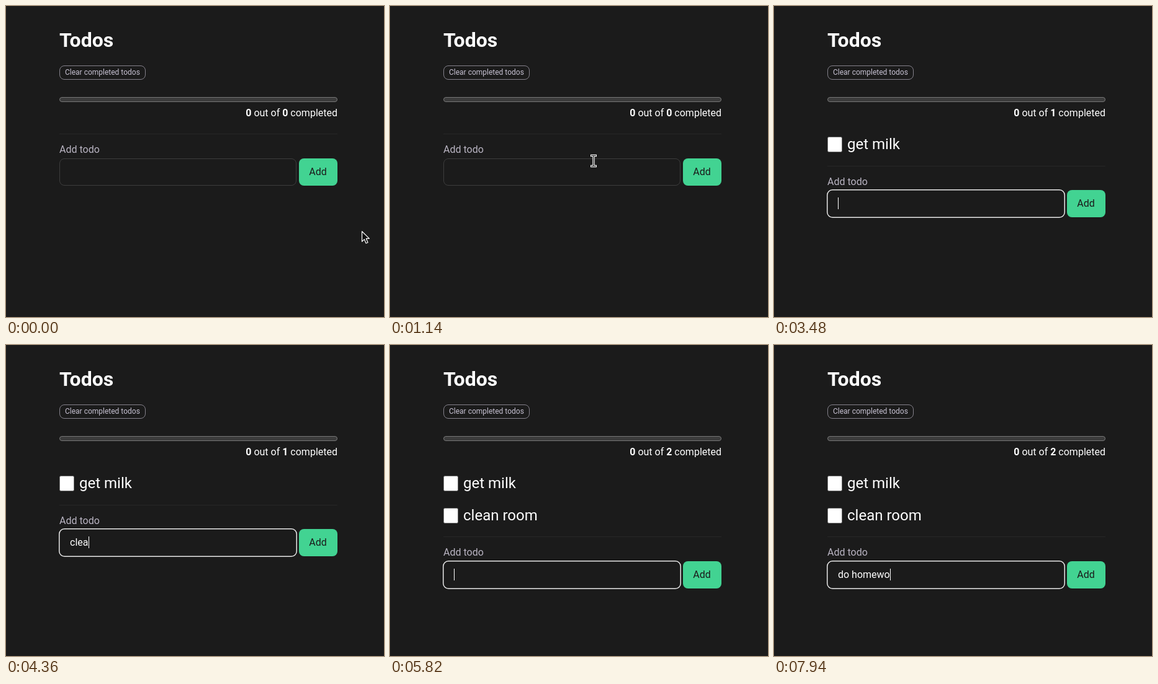
An HTML page that plays this animation: 609x502 px, repeating every 8000 ms.

```html
<!DOCTYPE html>
<html lang="en">
<head>
<meta charset="utf-8">
<title>Todos</title>
<style>
  html, body { margin: 0; width: 100%; height: 100%; overflow: hidden; background: #1b1b1b; }
  svg { display: block; width: 609px; height: 502px; }
  text { font: 16px Roboto, sans-serif; fill: #fff; white-space: pre; }
  .title { font-size: 32px; font-weight: 700; }
  .small { font-size: 12px; fill: #c8c3d4; }
  .label { fill: #b9b4c2; }
  .todo text { font-size: 24px; }
  .dark { fill: #1b1b1b; }
  .bold { font-weight: 700; }
  .line { fill: none; stroke: #3d3d3d; }
  .ring { fill: none; stroke: #e8e8e8; stroke-width: 1.5; }
  .check { fill: #fff; stroke: #767676; }
</style>
</head>
<body>
<svg viewBox="0 0 609 502">
  <rect width="609" height="502" fill="#1b1b1b"/>
  <text class="title" x="86" y="66">Todos</text>
  <rect x="86.5" y="96.5" width="138" height="22" rx="7.5" fill="none" stroke="#85828c"/>
  <text class="small" x="95" y="111">Clear completed todos</text>
  <rect x="86.5" y="147.5" width="447" height="7" rx="3.5" fill="#3b3b3b" stroke="#777"/>
  <text x="534" y="178" text-anchor="end"><tspan class="bold">0</tspan> out of <tspan class="bold" id="total">0</tspan> completed</text>

  <g class="todo">
    <rect class="check" x="86.5" y="211.5" width="23" height="24" rx="2"/>
    <text x="118" y="231">get milk</text>
  </g>
  <g class="todo" transform="translate(0 52)">
    <rect class="check" x="86.5" y="211.5" width="23" height="24" rx="2"/>
    <text x="118" y="231">clean room</text>
  </g>

  <g id="heading">
    <path d="M86 206.5H534" stroke="#272727"/>
    <text class="label" x="86" y="237">Add todo</text>
  </g>
  <g id="form">
    <rect id="border" class="line" x="86.5" y="246.5" width="381" height="43" rx="7.5"/>
    <rect id="ring" class="ring" x="85.75" y="245.75" width="382.5" height="44.5" rx="8.5"/>
    <text id="typed" x="103" y="273"></text>
    <rect id="caret" y="258" width="1" height="19" fill="#fff"/>
    <rect x="472" y="246" width="62" height="44" rx="8" fill="#42d392"/>
    <text class="dark" x="502.5" y="273" text-anchor="middle">Add</text>
  </g>

  <path id="arrow" d="M.5 .8V17.2L4.3 13.6L7 20L10 18.7L7.3 12.4H12.3Z" fill="#111" stroke="#fff" stroke-width="1.2" stroke-linejoin="round"/>
  <g id="beam" transform="translate(328 250)" fill="none">
    <path d="M-5 -8.5H5M-5 8.5H5M0 -8.5V8.5" stroke="#fff" stroke-width="3.4"/>
    <path d="M-4 -8.5H4M-4 8.5H4M0 -8.5V8.5" stroke="#111" stroke-width="1.2"/>
  </g>
</svg>
<script>
const LOOP = 8000, FOCUS = 1220, BEAM = 1140;
const headingShift = [0, 52, 103];
const formShift = [0, 51, 103];

// Each entry: when the field is cleared, the text typed next, and its key times.
const entries = [
  { start: 0, text: 'get milk', keys: [1540, 1700, 1860, 2020, 2600, 2760, 2920, 3080] },
  { start: 3400, text: 'clean room', keys: [3720, 4210, 4290, 4360, 4690, 4850, 5010, 5170, 5330, 5490] },
  { start: 5820, text: 'do homewo', keys: [6060, 6230, 6560, 6720, 6890, 7130, 7290, 7700, 7940] }
];

// Pointer stops: time, x, y.
const pointer = [
  [0, 573, 363], [90, 577, 310], [170, 586, 200], [250, 590, 126],
  [820, 570, 134], [900, 520, 158], [980, 450, 190], [1060, 370, 230]
];

const el = id => document.getElementById(id);
const show = (node, on) => { node.style.display = on ? '' : 'none'; };
const moveTo = (node, x, y) => node.setAttribute('transform', `translate(${x} ${y})`);
const todos = document.querySelectorAll('.todo');

function draw(t) {
  const count = entries.findLastIndex(entry => t >= entry.start);
  const { text, keys } = entries[count];
  const focused = t >= FOCUS;

  el('total').textContent = count;
  todos.forEach((todo, i) => show(todo, i < count));
  moveTo(el('heading'), 0, headingShift[count]);
  moveTo(el('form'), 0, formShift[count]);

  const typed = el('typed');
  typed.textContent = text.slice(0, keys.filter(key => t >= key).length);
  el('caret').setAttribute('x', Math.round(103.4 + typed.getComputedTextLength()));
  show(el('caret'), focused);
  show(el('ring'), focused);
  show(el('border'), !focused);

  const [, x, y] = pointer.findLast(stop => t >= stop[0]);
  moveTo(el('arrow'), x, y);
  show(el('arrow'), t < BEAM);
  show(el('beam'), t >= BEAM && count === 0);
}

function tick() {
  draw(performance.now() % LOOP);
  requestAnimationFrame(tick);
}
tick();
</script>
</body>
</html>
```
